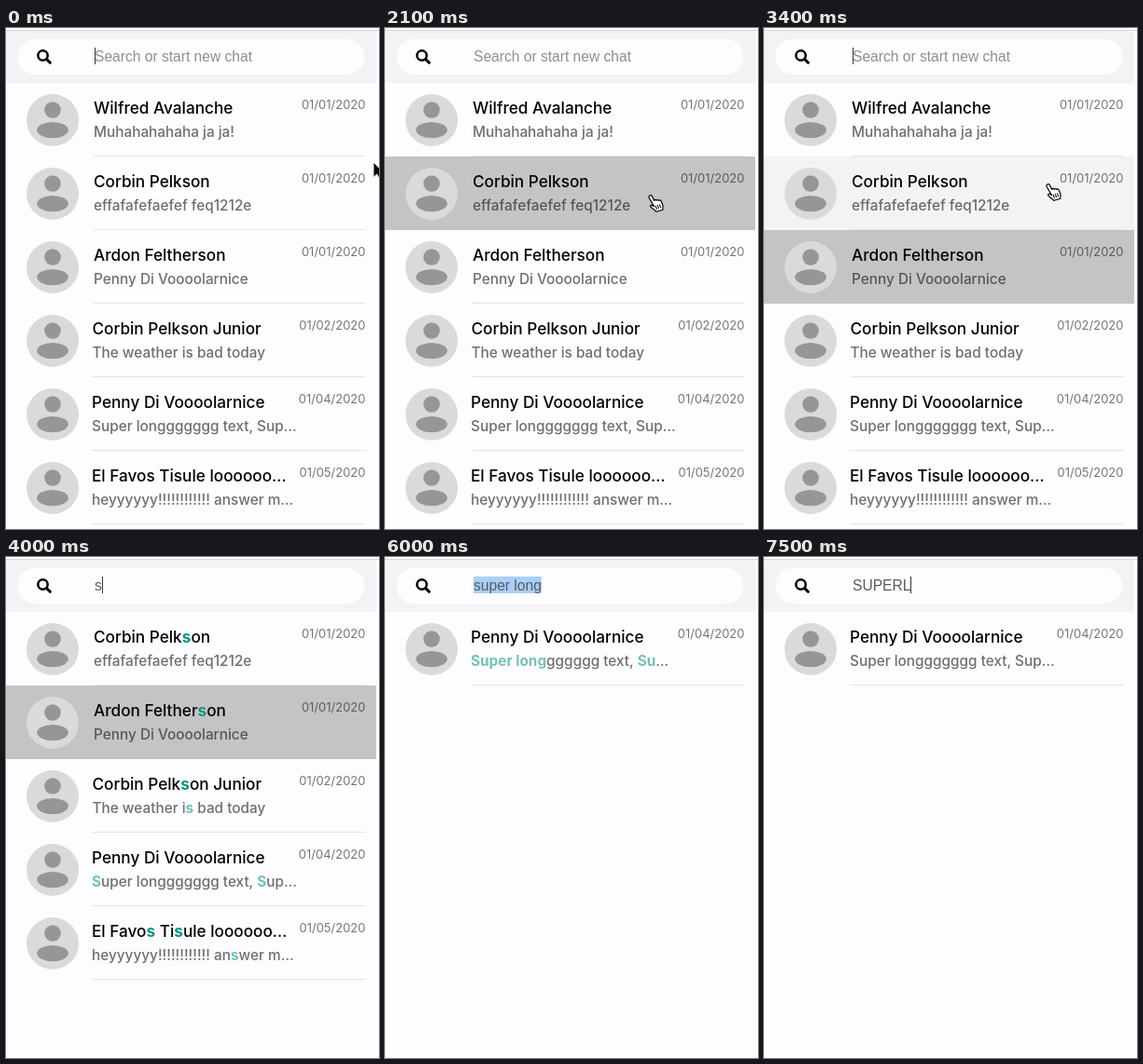
An HTML page for the animation above (8000 ms loop, 400 by 538 pixels).

```html
<!DOCTYPE html>
<html lang="en">
<head>
<meta charset="utf-8">
<title>Chat search</title>
<style>
  html, body { margin: 0; height: 100%; overflow: hidden; background: #fdfcfe; }
  svg { display: block; font-family: Inter, sans-serif; }
  text { white-space: pre; }
  .name { font-size: 17.2px; font-weight: 500; }
  .message { font-size: 15.35px; font-weight: 500; opacity: .56; }
  .date { font-size: 13px; text-anchor: end; opacity: .53; }
  .hit { fill: #0e9382; font-weight: 700; }
  #field { font: 15.6px "Liberation Sans", Arial, sans-serif; }
</style>
</head>
<body>
<svg width="400" height="538">
  <defs>
    <g id="avatar">
      <circle cx="50" cy="40" r="28" fill="#dadadc"/>
      <circle cx="50" cy="29" r="8.8" fill="#969598"/>
      <ellipse cx="50" cy="50.6" rx="16.8" ry="8.6" fill="#969598"/>
    </g>
    <path id="arrow" d="M0 0v16.5l3.8-3.6 3 6.6 2.6-1.2-2.9-6.4h5.2z" stroke="#fff"/>
    <g id="hand" transform="rotate(-10 8 10)" stroke="#000" stroke-width="1.2" stroke-linejoin="round" stroke-linecap="round">
      <path fill="#fff" d="M3 1.2c1.2-.9 2.4 0 2.7 1l1.6 5c.4-1 2-1 2.4.3.6-.9 2-.7 2.3.5.8-.7 2-.2 2.3.9l1 4c.4 2-.6 3.5-.8 5.6l-7.3.8c-1-2-3.6-3.8-5-6.3-.6-1.4 1-2.2 2.2-1.2l1.5 1.4L2.2 3.2c-.2-.8 0-1.5.8-2z"/>
      <path d="M7.6 13l.7 3.4M9.9 12.7l.6 3.4M12.1 12.4l.5 3.2" stroke-width="1"/>
    </g>
    <path id="beam" d="M5 2q3 0 3 2v12q0 2-3 2M11 2q-3 0-3 2v12q0 2 3 2" fill="none" stroke="#333"/>
  </defs>
  <rect width="397" height="56" y="3" fill="#f3f2f4"/>
  <rect width="400" height="1" y="2" fill="#d6d5d7"/>
  <rect x="12" y="12" width="372.5" height="38" rx="19" fill="#fdfcfe"/>
  <g fill="none" stroke="#000" stroke-linecap="round">
    <circle cx="39.5" cy="29.5" r="5.2" stroke-width="2.5"/>
    <path d="M43.6 33.6l3.7 3.7" stroke-width="3"/>
  </g>
  <rect id="selection" x="95" y="21" height="18" fill="#a9cffb"/>
  <text id="field" x="95" y="36"></text>
  <rect id="caret" y="21" width="1" height="18" fill="#333"/>
  <g id="list"></g>
  <use id="cursor"/>
</svg>
<script>
const DURATION = 8000, STEP = 100, LIST_TOP = 59, ROW = 79;

const chats = [
  { x: 94, name: "Wilfred Avalanche", message: "Muhahahahaha ja ja!", date: "01/01/2020" },
  { x: 94, name: "Corbin Pelkson", message: "effafafefaefef feq1212e", date: "01/01/2020" },
  { x: 94, name: "Ardon Feltherson", message: "Penny Di Voooolarnice", date: "01/01/2020" },
  { x: 92.5, name: "Corbin Pelkson Junior", message: "The weather is bad today", date: "01/02/2020" },
  { x: 92, name: "Penny Di Voooolarnice", message: "Super longgggggg text, Super longgggggg", date: "01/04/2020" },
  { x: 92, name: "El Favos Tisule looooooooooo", message: "heyyyyyy!!!!!!!!!!!! answer me", date: "01/05/2020" },
];
const NAME_LIMIT = 23, MESSAGE_LIMIT = { 4: 26, 5: 29 };

const typing = [
  [0, ""], [4000, "s"], [4200, "su"], [4600, "sup"], [4700, "super"],
  [5100, "super "], [5200, "super l"], [5300, "super lo"], [5400, "super lon"], [5500, "super long"],
  [6300, "S"], [6500, "SU"], [6600, "SUP"], [6700, "SUPE"], [6800, "SUPER"], [7500, "SUPERL"],
];
const clicks = [[0, -1], [1500, 0], [2100, 1], [2600, 2]];
const caretStarts = [[-300], [700], [3100], ...typing.slice(1)];
const pointerPath = [
  [0, 402, 154], [100, 398, 152], [300, 285, 130], [400, 285, 130], [800, 240, 366], [1000, 256, 354],
  [1300, 286, 112], [1800, 286, 112], [2000, 290, 188], [2200, 290, 188],
  [2500, 298, 276], [2600, 298, 276], [3000, 88, 33], [3100, 88, 33], [3400, 310, 176],
];

const $ = id => document.getElementById(id);
const latest = (events, t) => events.findLast(e => e[0] <= t);

function pointerAt(t) {
  const i = pointerPath.findIndex(p => p[0] > t);
  if (i < 0) return pointerPath.at(-1).slice(1);
  const [t0, x0, y0] = pointerPath[i - 1], [t1, x1, y1] = pointerPath[i];
  const k = (t - t0) / (t1 - t0);
  return [x0 + (x1 - x0) * k, y0 + (y1 - y0) * k];
}

// Bold matches take more room, so a heavily marked text is cut one letter earlier.
function marked(text, query, limit = Infinity) {
  const parts = query ? text.split(new RegExp(`(${query})`, "i")) : [text];
  const bold = parts.filter((_, i) => i % 2).join("").length;
  let room = limit - (bold > 4 ? 1 : 0);
  const html = parts.map((part, i) => {
    const shown = part.slice(0, Math.max(room, 0));
    room -= shown.length;
    return i % 2 ? `<tspan class="hit">${shown}</tspan>` : shown;
  }).join("");
  return html + (text.length > limit ? "…" : "");
}

function matches(chat, query) {
  const plain = s => s.toLowerCase().replaceAll(" ", "");
  return [chat.name, chat.message].some(s => plain(s).includes(plain(query)));
}

function rowMarkup(chat, index, query, selected, hovered) {
  const id = chats.indexOf(chat), active = id === selected;
  const background = active ? "#c6c3c4" : index === hovered ? "#f3f2f4" : "none";
  return `<g transform="translate(0 ${LIST_TOP + index * ROW})">
    <rect width="397" height="${ROW}" fill="${background}"/>
    <use href="#avatar"/>
    <text class="name" x="${chat.x}" y="33">${marked(chat.name, query, NAME_LIMIT)}</text>
    <text class="message" x="${chat.x}" y="58">${marked(chat.message, query, MESSAGE_LIMIT[id])}</text>
    <text class="date" x="385.5" y="28">${chat.date}</text>
    ${active ? "" : `<rect x="${chat.x}" y="78" width="${385.5 - chat.x}" height="1" fill="#e4e3e5"/>`}
  </g>`;
}

function draw(t) {
  const query = latest(typing, t)[1];
  const selected = latest(clicks, t)[1];
  const [x, y] = pointerAt(t);
  const hovered = t < 200 ? -1 : Math.floor((y - 9 - LIST_TOP) / ROW);

  $("list").innerHTML = chats.filter(chat => matches(chat, query))
    .map((chat, i) => rowMarkup(chat, i, query, selected, hovered)).join("");

  const field = $("field");
  field.textContent = query || "Search or start new chat";
  field.setAttribute("fill", query ? "#5a595c" : "#8f8e91");
  const width = query ? field.getComputedTextLength() : 0;
  $("selection").setAttribute("width", t >= 6000 && t < 6300 ? width : 0);
  $("caret").setAttribute("x", Math.round(95 + width));
  $("caret").setAttribute("opacity", t - latest(caretStarts, t)[0] < 500 ? 1 : 0);

  const cursor = $("cursor");
  cursor.setAttribute("href", t < 200 ? "#arrow" : y < LIST_TOP ? "#beam" : "#hand");
  cursor.setAttribute("transform", `translate(${x - 8} ${y - 10})`);
  cursor.setAttribute("opacity", t < 4000 ? 1 : 0);
}

const start = performance.now();
let shownTime = -1;
function tick() {
  const elapsed = (performance.now() - start) % DURATION;
  const time = Math.floor(elapsed / STEP) * STEP;
  if (time !== shownTime) draw(shownTime = time);
  requestAnimationFrame(tick);
}
tick();
</script>
</body>
</html>
```
